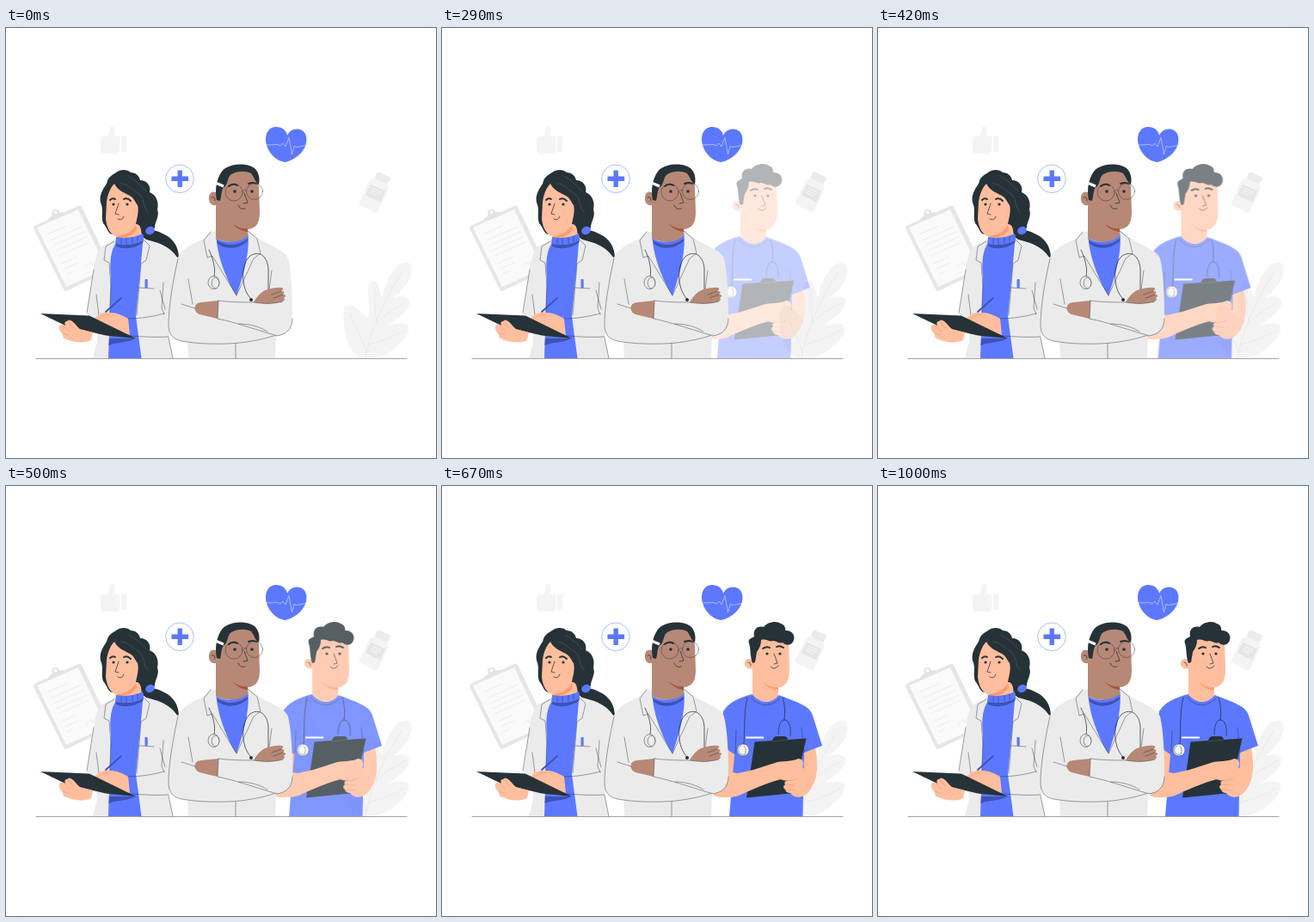
Recreate the animation shown at these times as an HTML page. Size 500x500 px, loop 1040 ms.

```html
<!DOCTYPE html>
<html lang="en">
<head>
<meta charset="utf-8">
<title>Medical team</title>
<style>
  html, body { margin: 0; width: 100%; height: 100%; overflow: hidden; background: #fff; }
  svg { display: block; width: 100%; height: 100%; }
  .dark { fill: #263238; }
  .blue { fill: #5c78ff; }
  .navy { fill: #3d52b5; }
  .coat { fill: #ebebeb; }
  .pale { fill: #ffbe9d; }
  .blush { fill: #ff9a6c; }
  .brown { fill: #b78876; }
  .faint { fill: #f4f4f4; }
  .line, .thin, .brow, .vein { fill: none; stroke: #263238; stroke-linecap: round; stroke-linejoin: round; }
  .line { stroke-width: .75; }
  .thin { stroke-width: .45; }
  .brow { stroke-width: 1.9; }
  .vein { stroke: #e3e3e3; stroke-width: .6; }
  .crease { fill: none; stroke: #d98f6c; stroke-width: .5; stroke-linecap: round; }
  .white { fill: none; stroke: #fff; }
</style>
</head>
<body>
<svg viewBox="0 0 500 500">
  <!-- backdrop -->
  <path fill="#e6e6e6" d="M33 230 L85 206.500 Q87 206 88 208 L123 281 L70 306 Q68 306.500 67 304 L32 233Z"/>
  <path fill="#fafafa" d="M36 232 L84 211 L117 280 L70 301Z"/>
  <path fill="#e3e3e3" d="M49 222 L54 218 A4.500 4.500 0 1 1 62 214.500 L67 214 L68 217 L51 225Z"/>
  <circle cx="57.500" cy="214.500" r="2" fill="#fff"/>
  <path class="vein" d="M48 240 L70 230 M52 247 L88 231 M55 253 L91 237 M58 259 L94 243 M61 265 L97 249 M65 274 L82 266 M68 280 L84 273 M71 286 L78 283 M94 277 q5 -9 6 -2 q4 -6 8 -4"/>
  <g class="faint">
    <path d="M110 129 Q110 126 114 126 L118 126 C121 122 120 118 121 115 Q124 112 126 116 C127 120 125 123 126 126 L132 126 Q133 128 132 143 Q131 146 127 146 L113 146 Q110 146 110 142Z"/>
    <path d="M134 126 L140.500 125 L139.500 144 L134 144.500Z"/>
  </g>
  <circle cx="202" cy="175.300" r="16.300" fill="#fff" stroke="#5c78ff" stroke-width=".5"/>
  <path class="blue" d="M199.500 165.500 h5.400 v7 h7.200 v5.400 h-7.200 v7.200 h-5.400 v-7.200 h-7 v-5.400 h7Z"/>
  <path class="blue" d="M324 156 C317 155 306 148 303 136 C300 124 305 115 314 115 C321 115 326 119 327 125 C329 120 334 117 339 117.500 C347 118 351 125 349 134 C346 147 332 155 324 156Z"/>
  <path class="white" stroke-width=".6" stroke-opacity=".8" d="M303 136 L316 135.500 L319 137 L322 134 L325 138 L329 127.500 L332.500 147 L335 137.500 L338 138.500 L348.500 136.500"/>
  <g transform="translate(430 190) rotate(25)">
    <rect x="-8" y="-22" width="17" height="9" rx="2.500" fill="#ebebeb"/>
    <path class="faint" d="M-8 -13 H9 L12 -8 V20 Q12 22 10 22 H-10 Q-12 22 -12 20 V-8Z"/>
    <rect x="-9" y="-5" width="19" height="14" fill="#e6e6e6"/>
    <path class="white" stroke-width=".6" d="M-6 -2 H7 M-6 1 H7 M-6 4 H4"/>
  </g>
  <path class="faint" d="M397 322 C405 321 412 330 420 338 C424 334 421 320 421 306 C421 296 425 293 428 294 C434 296 433 306 437 313 C440 300 446 284 456 276 C462 272 470 271 471 277 C474 288 466 302 450 314 C458 311 468 312 469 317 C471 326 458 336 444 346 C452 343 466 342 468 347 C470 356 458 370 444 378 C436 382 428 384 418 384 C404 384 394 366 393 345 C392 330 393 323 397 322Z"/>
  <path class="vein" d="M418 384 C424 350 436 325 460 284 M400 333 C408 350 416 365 419 378 M429 302 C428 315 429 330 431 342 M465 319 C450 328 438 334 431 343 M464 351 C450 360 435 365 421 368"/>
  <path class="thin" d="M35 384.500 H466"/>

  <!-- nurse who slides in -->
  <g id="nurse" opacity="0">
    <path class="pale" d="M420 305 L434 304 C437 320 437 335 433 344 C429 354 424 359 418 360 L412 340 L420 325Z"/>
    <path class="pale" d="M326 300 L340 308 L346 336 L318 345Z"/>
    <path class="blue" d="M361 242 C345 246 333 252 327 262 L322 300 L340 312 L334 384 H419.500 L421 310 L442 302 L432 270 C430 262 426 258 420 255 C411 250 402 247 391 243 Q376 258 361 242Z"/>
    <path class="pale" d="M361 212 C355 214 351 209 352 205 C353 200 359 200 362 204 L365 186 C368 176 384 170 403 180 L404 214 C404 227 399 234 391 234 V244 Q377 259 361 243Z"/>
    <path class="blush" d="M373 228 C378 233 385 235 391 234 V237 C384 237 377 234 373 228Z"/>
    <path class="dark" d="M361 206 C358 198 359 189 357 183 C355 178 360 177 363 175 C361 167 367 162 374 164 C378 158 389 156 394 160 C398 161 400 165 399 168 C406 167 411 173 409 179 C407 186 400 186 396 182 C392 184 389 180 385 180 C381 182 377 177 371 179 C371 186 368 190 366 193 L364 205Z"/>
    <path class="brow" d="M373 189 Q377 186 381 188 M389 187 Q393 185 397 188"/>
    <circle class="dark" cx="378" cy="195" r="1.600"/><circle class="dark" cx="393" cy="195" r="1.600"/>
    <path class="line" d="M386 195 L390 206 L386 207 M382 210 Q386 215 391 209 M356 205 Q359 205 359 209"/>
    <path class="thin" d="M359 246 Q376 263 393 247 M421 310 L418 281 M341 310 L342 284"/>
    <path class="line" d="M355 246 C351 260 352 285 351 300 M396 246 Q400 258 398 272 M391 289 C391 278 394 272 398 272 C403 272 406 279 405 290"/>
    <path class="white" stroke-width="2" d="M353 292.500 H374"/>
    <circle cx="350" cy="307" r="7" fill="#f5f5f5" stroke="#263238" stroke-width=".5"/>
    <path class="thin" d="M348 302 a5 5 0 1 0 4 10 M351 302 Q355 307 352 312"/>
    <path class="dark" d="M363.500 297.500 L384 296 Q385 291 390 291 H397 Q402 291 402 295 L423.500 293.500 L409 357 L354 362.500Z"/>
    <path class="thin" style="stroke:#607078" d="M384 297 L402 295"/>
    <!-- forearm resting across the board -->
    <path class="pale" d="M320 330 L344 334 L362 330 L387 322 C395 319 407 321 414 317 Q420 317 420 323 L418 337 C411 343 401 344 394 341 C378 345 358 354 345 360 C335 363 322 363 316 360Z"/>
    <path class="pale" d="M419 328 C414 336 411 341 404 342 Q396 343 399 347 Q395 350 399 353 Q400 357 405 357 C408 362 416 363 421 360 C430 355 434 342 434 330Z"/>
    <path class="crease" d="M400 347 L410 348 M399 353 L411 354 M391 340 C399 344 408 343 414 340"/>
  </g>

  <!-- woman with notes -->
  <path class="dark" d="M155 236 C168 233 177 236 184 240 C195 245 201 255 201 268 C193 260 184 264 175 256 C168 251 163 246 158 242Z"/>
  <path class="coat" d="M128 246 L113 253 C107 257 105 264 102 280 L94 332 L106 339 L106 365 L101 384 H194 L189 360 L200 270 C198 262 188 254 177 250 L160 245Z"/>
  <path class="blue" d="M128 243 Q145 247 160 239 L158 262 L151 335 L157.500 384 H119 L122 290 C120 272 122 258 128 250Z"/>
  <path class="navy" d="M120 361 L150 361 C140 367 127 365 119.500 369Z"/>
  <path class="dark" d="M117 181 C119 172 124 171 128 168 C133 164 141 164 145 168 C151 168 155 172 156 177 C164 177 169 184 167 191 C175 194 178 203 176 211 C179 219 173 225 173 232 C169 239 160 243 152 240 H125 C118 240 118 232 113 227 C110 219 114 211 110 203 C108 194 113 187 117 181Z"/>
  <path class="pale" d="M117 202 C118 194 121 186 126 181 C130 189 137 191 142 194 C148 196 150 202 153 206 C155 213 152 222 151 228 C157 228 157 235 158 241 Q144 249 129 243 C121 240 117 232 116 222Z"/>
  <path class="blush" d="M130 242 C139 241 147 237 151 229 L152 234 C148 241 139 245 130 244Z"/>
  <path class="blue" d="M128 243 Q145 246 159 239 L160 247 Q144 255 127 251Z"/>
  <path class="navy" d="M128 251 Q144 255 160 247 L159 250 Q143 260 128 254Z"/>
  <path class="thin" d="M134 245 v6 M140 245 v7 M147 244 v6 M153 242 v6"/>
  <ellipse class="blue" cx="167.500" cy="235.500" rx="5.500" ry="4.500" transform="rotate(-25 167.500 235.500)"/>
  <path class="thin" style="stroke:#5d6c73" d="M134 181 C142 181 147 189 155 193 C162 199 158 207 165 214 M143 173 C151 177 158 184 163 190"/>
  <path class="brow" d="M121 200 Q124 197 127 199 M137 199 Q141 197 145 201"/>
  <circle class="dark" cx="125" cy="205" r="1.600"/><circle class="dark" cx="141" cy="205" r="1.600"/>
  <path class="line" d="M131 204 L127 216 L131 217 M130 222 Q135 225 137 219"/>
  <path class="thin" d="M126 248 L116 254 L114 270 L120 273 L122 300 L120 345 M160 246 L167 253 L163 270 L157 274 L152 334 M102 281 L94 331 M105 310 L108 334 M155 302 L172 303 M183 296 L181 326 L184 333 M142 338 C158 338 172 335 184 332 M145 358 C160 359 175 360 189 359 M179 305 L185 327 M189 360 L194 384"/>
  <rect class="blue" x="161.500" y="292" width="3.200" height="10.500" rx="1"/>
  <path class="pale" d="M103 338 C107 332 115 329 122 331 C130 331 137 335 142 338 L144 357 L123 351Z"/>
  <path d="M116 330 L134 314" stroke="#3d52b5" stroke-width="1.800" stroke-linecap="round"/>
  <path class="crease" d="M106 339 Q112 333 121 333"/>
  <path class="dark" d="M40 332 L97 334.500 L151 361 L116 357.500 L71 347Z"/>
  <path class="pale" d="M62 346 Q66 343 69 346 Q67 341 71 341 Q73 338 77 341 C81 344 82 347 86 350 L101 354 L99 363 C91 367 78 366 71 362 Q65 361 66 356 Q61 352 62 346Z"/>
  <path class="crease" d="M68 346 L73 352 M72 341 L78 349 M66 355 L72 357"/>

  <!-- doctor in the middle -->
  <path class="coat" d="M238 237 L228 246 C213 252 203 259 200 267 C194 295 189 325 189 345 C189 361 200 364 211 365 L212 384 H313 L314 358 C326 357 333 350 333 338 C333 310 332 285 328 268 C325 258 300 250 291 243 L281 235Z"/>
  <path class="blue" d="M244 244 Q263 256 281 236 C284 254 279 280 268 311 C259 298 247 270 245 248Z"/>
  <path class="navy" d="M245 247 Q264 258 281 245 V248 Q264 262 246 251Z"/>
  <path class="brown" d="M244 206 C239 207 235 203 236 196 C237 190 243 189 246 193 L252 176 C256 166 270 162 284 166 C291 170 293 178 294 185 L295 214 C295 227 291 233 281 234 V242 C270 251 254 250 244 244Z"/>
  <path fill="#a8573d" d="M263 227 C268 231 275 234 281 233 V237 C273 236 267 232 263 227Z"/>
  <path class="dark" d="M245 200 C242 187 246 169 255 163 C267 156 284 158 290 164 C295 170 295 176 294 182 C290 180 289 174 285 169 C279 166 271 166 264 169 C257 172 259 178 255 184 C250 186 251 194 249 201Z"/>
  <path class="white" stroke-width="3" d="M243.500 180 L253 184"/>
  <g class="thin">
    <circle cx="265" cy="191" r="10"/><circle cx="289" cy="190" r="9.500"/>
    <path d="M275 190 Q277 187 279.500 189"/>
  </g>
  <path class="brow" d="M259 184 Q264 180 269 183 M282 181 Q287 179 291 181"/>
  <circle class="dark" cx="266" cy="190" r="1.800"/><circle class="dark" cx="286" cy="190" r="1.800"/>
  <path class="line" d="M277 192 L281 203 L276 204 M270 206 Q272 212 278 210 M239 197 Q243 195 243 201"/>
  <path class="thin" d="M238 237 L230 247 L234 267 L240 265 L268 311 M281 236 L292 245 L296 262 L288 268 L268 311 M200 268 C194 295 189 325 189 345 C189 361 200 364 211 365 C230 368 262 368 280 365 Q300 362 314 357 M314 358 C326 357 333 350 333 338 M212 292 L217 321 M309 282 L306 304 M267 367 V384"/>
  <path class="line" d="M236 258 C241 268 244 280 242 289 M286 316 C272 304 273 273 284 265 C294 258 304 265 305 280 L305 304"/>
  <circle class="dark" cx="285" cy="316" r="2"/>
  <g fill="#ebebeb" stroke="#263238" stroke-width=".5">
    <ellipse cx="241.500" cy="296" rx="6.500" ry="7.500"/>
    <ellipse cx="243.500" cy="296.500" rx="4.300" ry="6.300"/>
  </g>
  <path class="brown" d="M247 317 L227 319 Q219 320 219.500 326 Q220 331 225 333 L246 338Z"/>
  <path class="brown" d="M288 319 C291 313 297 306 304 304 Q315 301 321 302 Q324 303 320 306 Q326 306 322 310 Q328 310 323 314 Q326 316 321 318 C313 321 299 321 288 319Z"/>
  <path class="thin" d="M247 317 C262 319 280 319 288 319 C300 321 310 321 322 318 M247 317 L246 338 C266 342 288 350 312 357 M271 344 C285 344 296 348 304 353 M220 326 L204 321 M320 306 L309 310 M322 310 L311 314"/>
</svg>
<script>
  const LOOP = 1040, FPS = 24;
  const nurse = document.getElementById('nurse');

  // Fade and slide share one curve with a small overshoot.
  const slide = nurse.animate([
    { opacity: 0, transform: 'translateX(-22px)' },
    { opacity: 1, transform: 'translateX(0px)' }
  ], { duration: 1000, easing: 'cubic-bezier(.4,.2,.5,1.35)', fill: 'both' });
  slide.pause();

  const start = performance.now();
  function draw() {
    const ms = (performance.now() - start) % LOOP;
    const step = Math.min(FPS, Math.floor(ms * FPS / 1000 + .15));
    slide.currentTime = step < 2 ? 0 : step / FPS * 1000;
    requestAnimationFrame(draw);
  }
  draw();
</script>
</body>
</html>
```
